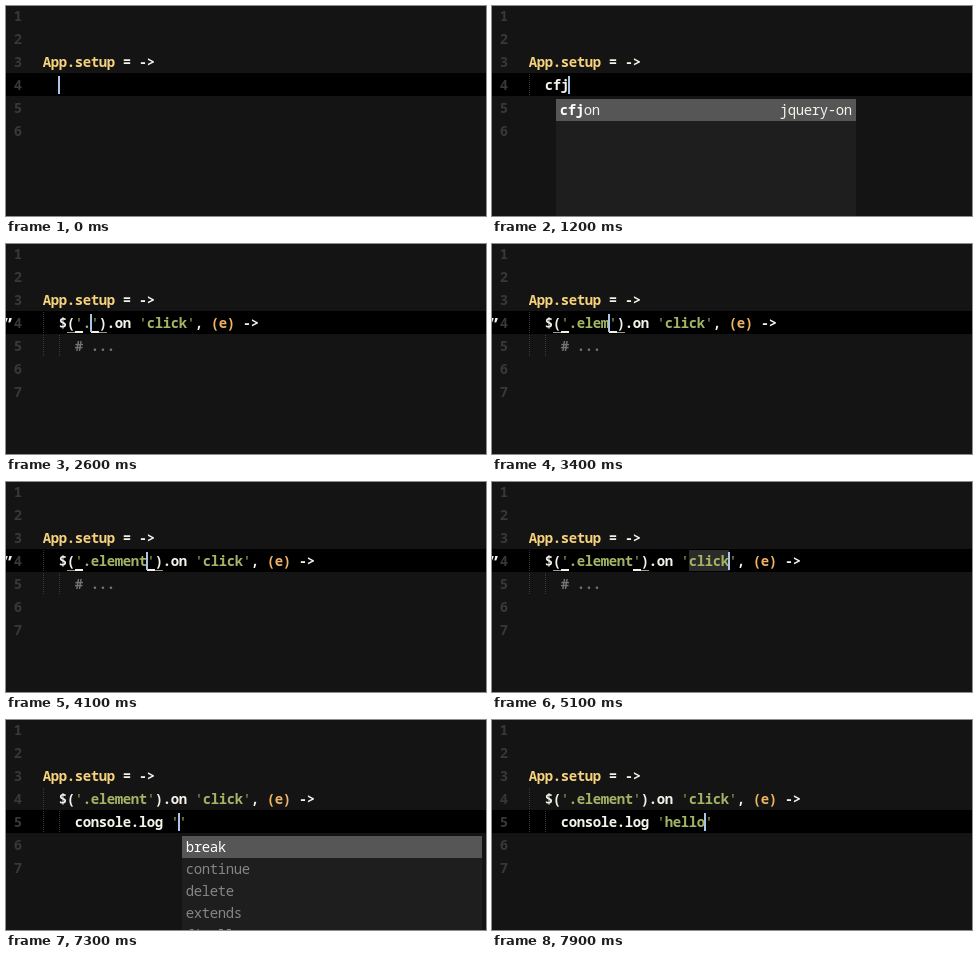
Write an HTML page with a canvas that moves like this. It is 480 by 210 pixels and loops after 8 s.

```html
<!DOCTYPE html>
<html lang="en">
<head>
<meta charset="utf-8">
<title>Editor</title>
<style>
html, body { margin: 0; width: 100%; height: 100%; overflow: hidden; background: #141414; }
canvas { display: block; width: 480px; height: 210px; }
</style>
</head>
<body>
<canvas id="stage"></canvas>
<script>
const LOOP = 8000, CELL = 8, LINE = 23, LEFT = 37;
const FONT = '14px "Noto Sans Mono", "DejaVu Sans Mono", monospace';
const C = {
  bg: '#141414', band: '#000', number: '#383838', guide: '#3a3a3a',
  text: '#f4f3ea', name: '#f6d27c', string: '#a3b565', quote: '#66753d',
  param: '#f0b264', note: '#747474', caret: '#a9c6e6', select: '#2b2b2b',
  panel: '#1e1e1e', row: '#565656', item: '#858585'
};
const KEYWORDS = ['break', 'continue', 'delete', 'extends', 'finally'];

const canvas = document.getElementById('stage');
const ctx = canvas.getContext('2d');
const ratio = window.devicePixelRatio || 1;
canvas.width = 480 * ratio;
canvas.height = 210 * ratio;
ctx.scale(ratio, ratio);

// Number of key presses made by time t
const count = (times, t) => times.filter(k => t >= k).length;
const typed = (word, times, t) => word.slice(0, count(times, t));
const colX = col => LEFT + col * CELL;
const rowY = row => (row - 1) * LINE - 2;

function rect(x, y, w, h, color) {
  ctx.fillStyle = color;
  ctx.fillRect(x, y, w, h);
}

// Monospaced text on the 8px grid; returns the x after the last cell
function write(str, x, y, color, weight = 600) {
  ctx.font = weight + ' ' + FONT;
  ctx.fillStyle = color;
  ctx.textAlign = 'center';
  for (const ch of str) {
    ctx.fillText(ch, x + CELL / 2, y);
    x += CELL;
  }
  return x;
}

function code(row, col, parts) {
  let x = colX(col);
  for (const [str, color] of parts) x = write(str, x, rowY(row) + 17, C[color]);
}

function guide(col, row) {
  for (let y = 1; y < LINE; y += 2) rect(colX(col), rowY(row) + y, 1, 1, C.guide);
}

function caret(row, col) {
  rect(colX(col) - 1, rowY(row) + 3, 2, 18, C.caret);
}

function mark(row, col, strong) {
  const y = rowY(row) + 20;
  if (strong) rect(colX(col), y, CELL, 2, C.text);
  else rect(colX(col), y + 1, CELL, 1, '#9a9a95');
}

function quoteSign(row) {
  ctx.font = 'bold 18px "Noto Sans", sans-serif';
  ctx.textAlign = 'left';
  ctx.fillStyle = C.text;
  ctx.fillText('\u201d', -2, rowY(row) + 20);
}

function panel(x, y) {
  rect(x, y, 300, 210 - y, C.panel);
  rect(x, y, 300, 22, C.row);
}

function shortcut(t) {
  const word = typed('cfjon', [600, 800, 1100, 1300, 1400], t);
  code(4, 2, [[word, 'text']]);
  caret(4, 2 + word.length);
  if (word) guide(0, 4);
  if (t < 800 || t >= 1600) return;
  panel(64, 93);
  const x = write(word, 68, 109, '#fff', 700);
  write('cfjon'.slice(word.length), x, 109, C.text, 500);
  write('jquery-on', 288, 109, C.text, 500);
}

function handler(t) {
  const sel = typed('.element', [2300, 3000, 3100, 3200, 3400, 3600, 3700, 3800], t);
  const end = 5 + sel.length;
  const click = end + 7;
  guide(0, 4);
  guide(0, 5);
  guide(2, 5);

  if (t >= 5100 && t < 5400) rect(colX(click), rowY(4) + 1, 40, 21, C.select);
  if (t >= 5400 && t < 5800) rect(colX(4), rowY(5) + 1, 40, 21, C.select);

  code(4, 2, [
    ['$(', 'text'], ["'", 'quote'], [sel, 'string'], ["'", 'quote'],
    [').on ', 'text'], ["'", 'quote'], ['click', 'string'], ["'", 'quote'],
    [', ', 'text'], ['(e)', 'param'], [' ->', 'text']
  ]);

  if (t >= 2200 && t < 5300) {
    mark(4, 3, false);
    mark(4, 4, true);
    mark(4, end, true);
    mark(4, end + 1, false);
  } else if (t >= 5300 && t < 5400) {
    mark(4, click - 1, true);
    mark(4, click + 5, true);
  }
  if (t >= 2200 && t < 5400) quoteSign(4);

  if (t < 5800) {
    code(5, 4, [['# ...', 'note']]);
    if (t < 5100) caret(4, end);
    else if (t < 5400) caret(4, click + 5);
    else caret(5, 9);
  } else {
    logCall(t);
  }
}

function logCall(t) {
  const call = typed('console.log ',
    [5800, 6000, 6200, 6200, 6300, 6400, 6600, 6700, 6800, 6900, 7000, 7100], t);
  const word = typed('hello', [7500, 7600, 7700, 7800, 7900], t);
  const open = t >= 7200;
  code(5, 4, [[call, 'text']]);
  if (open) {
    code(5, 16, [["'", 'quote'], [word, 'string'], ["'", 'quote']]);
  }
  caret(5, 4 + call.length + (open ? 1 + word.length : 0));
  if (open && t < 7500) {
    panel(176, 116);
    KEYWORDS.forEach((k, i) => write(k, 180, 132 + i * 22, i ? C.item : '#fff', 500));
  }
}

function draw(t) {
  rect(0, 0, 480, 210, C.bg);
  rect(0, rowY(t < 5800 ? 4 : 5), 480, LINE, C.band);
  const lines = t < 1700 ? 6 : 7;
  for (let n = 1; n <= lines; n++) write(String(n), 8, rowY(n) + 17, C.number);
  code(3, 0, [['App.setup', 'name'], [' = ->', 'text']]);
  if (t < 1700) shortcut(t);
  else handler(t);
}

const start = performance.now();
function tick() {
  draw((performance.now() - start) % LOOP);
  requestAnimationFrame(tick);
}
tick();
</script>
</body>
</html>
```
